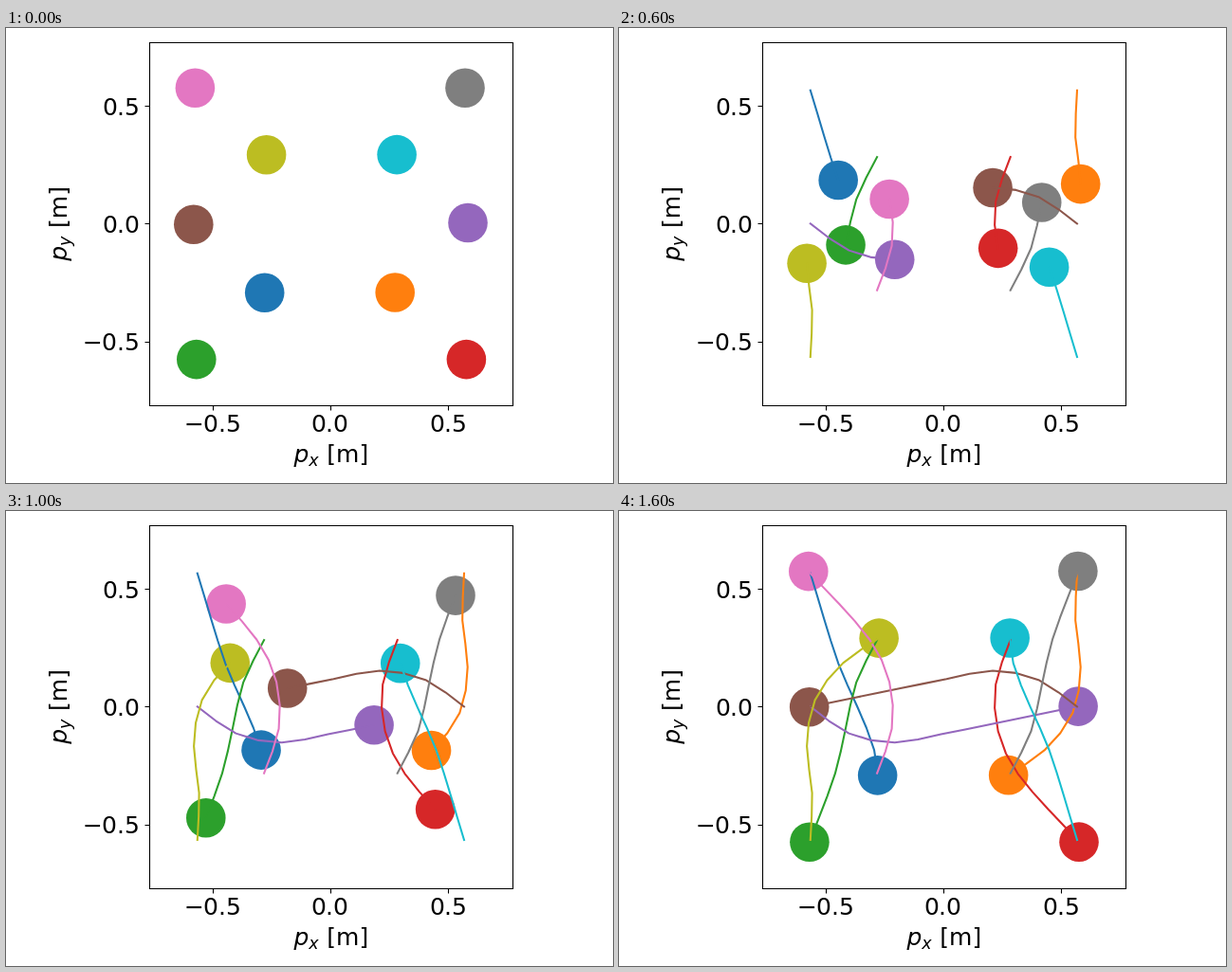
An HTML page that plays this animation: 640 px wide and 480 px high, repeating every 1.7 s.

```html
<!DOCTYPE html>
<html lang="en">
<head>
<meta charset="utf-8">
<title>Swapping robots</title>
<style>
  html, body { margin: 0; width: 100%; height: 100%; overflow: hidden; background: #fff; }
  svg { display: block; width: 640px; height: 480px; }
  text { font: 25px "DejaVu Sans", sans-serif; white-space: pre; }
  .math { font-style: italic; }
  .sub { font-style: italic; font-size: 17.5px; }
  #axes { fill: none; stroke: #000; stroke-width: 1.1; }
  #trails { fill: none; stroke-width: 2.08; stroke-linecap: square; stroke-linejoin: round; }
</style>
</head>
<body>
<svg viewBox="0 0 640 480">
  <g id="discs"></g>
  <path id="axes" d="M151.5 15.5H534.5V398.5H151.5Z
    M218.5 398.5v5M342.5 398.5v5M466.5 398.5v5
    M151.5 82.5h-5M151.5 206.5h-5M151.5 331.5h-5"/>
  <g id="trails"></g>
  <text x="188" y="426" dx="0 -.9">−0.5</text>
  <text x="322" y="426" dx="0 -.9">0.0</text>
  <text x="447" y="426" dx="0 -.9">0.5</text>
  <text x="102" y="92" dx="0 -.9">0.5</text>
  <text x="102" y="216" dx="0 -.9">0.0</text>
  <text x="81" y="340" dx="0 -.9">−0.5</text>
  <text x="303.4" y="458"><tspan class="math">p</tspan><tspan class="sub" dy="4">x</tspan><tspan dx=".7" dy="-4"> [m]</tspan></text>
  <text transform="translate(64 245.8) rotate(-90)"><tspan class="math">p</tspan><tspan class="sub" dy="4">y</tspan><tspan dx=".7" dy="-4"> [m]</tspan></text>
</svg>
<script>
const STEP = 100, COUNT = 17, RADIUS = 20.8;
const SPEED = 24.8, BRAKE = 0.52; // pixels per step, share of the remaining way
const COLORS = ["#1f77b4", "#ff7f0e", "#2ca02c", "#d62728", "#9467bd",
  "#8c564b", "#e377c2", "#7f7f7f", "#bcbd22", "#17becf"];

// Start, bends and goal of five robots; the other five mirror them through the centre.
const ROUTES = [
  "201.8,65.8 231.3,160.9 251.2,206.3 268.2,248.9 272.7,279.2",
  "483,65.8 481.2,115.5 486.7,164.8 478.3,213.1 449.3,251.7 410.2,279",
  "272.1,136.1 250.2,180.8 239.1,228.7 227.9,276.9 200.8,349.6",
  "412.7,136.1 397.2,183 399.6,232 420.2,276.7 485.4,349.6",
  "201.8,206.4 242.6,234.7 289.8,244.3 339,235.6 487,205.5"
].map(route => route.split(" ").map(p => p.split(",").map(Number)));

const mirror = ([x, y]) => [684.8 - x, 412.8 - y];

function make(tag, attrs, parent) {
  const el = document.createElementNS("http://www.w3.org/2000/svg", tag);
  for (const key in attrs) el.setAttribute(key, attrs[key]);
  if (parent) document.getElementById(parent).append(el);
  return el;
}

// Smooth curve whose direction at each point is parallel to the line between its neighbours.
function curve(points) {
  const handle = (i, length) => {
    const a = points[Math.max(i - 1, 0)];
    const b = points[Math.min(i + 1, points.length - 1)];
    const k = length / Math.hypot(b[0] - a[0], b[1] - a[1]);
    return points[i].map((v, axis) => v + (b[axis] - a[axis]) * k);
  };
  let d = "M" + points[0];
  for (let i = 1; i < points.length; i++) {
    const [p, q] = [points[i - 1], points[i]];
    const third = Math.hypot(q[0] - p[0], q[1] - p[1]) / 3;
    d += `C${handle(i - 1, third)} ${handle(i, -third)} ${q}`;
  }
  return make("path", { d });
}

// Constant speed along the curve, braking close to the goal.
function travel(points) {
  const line = curve(points), total = line.getTotalLength(), path = [];
  for (let n = 2, way = 0; n < COUNT; n++) {
    const { x, y } = line.getPointAtLength(way);
    path.push([x, y]);
    way += Math.min(SPEED, BRAKE * (total - way));
  }
  return path;
}

const robots = COLORS.map((color, i) => {
  const route = i < 5 ? ROUTES[i] : ROUTES[9 - i].map(mirror);
  return {
    goal: route[route.length - 1],
    path: travel(route),
    disc: make("circle", { r: RADIUS, fill: color }, "discs"),
    trail: make("polyline", { stroke: color }, "trails")
  };
});

// The loop opens with everyone at the goal, then waits one step at the start.
function draw(step) {
  const reached = Math.max(0, step - 2);
  for (const { goal, path, disc, trail } of robots) {
    const [x, y] = step ? path[reached] : goal;
    disc.setAttribute("cx", x);
    disc.setAttribute("cy", y);
    trail.setAttribute("points", reached ? path.slice(0, reached + 1).join(" ") : "");
  }
}

const start = performance.now();
let shown = -1;
function tick() {
  const step = Math.floor((performance.now() - start) / STEP) % COUNT;
  if (step !== shown) draw(shown = step);
  requestAnimationFrame(tick);
}
tick();
</script>
</body>
</html>
```
